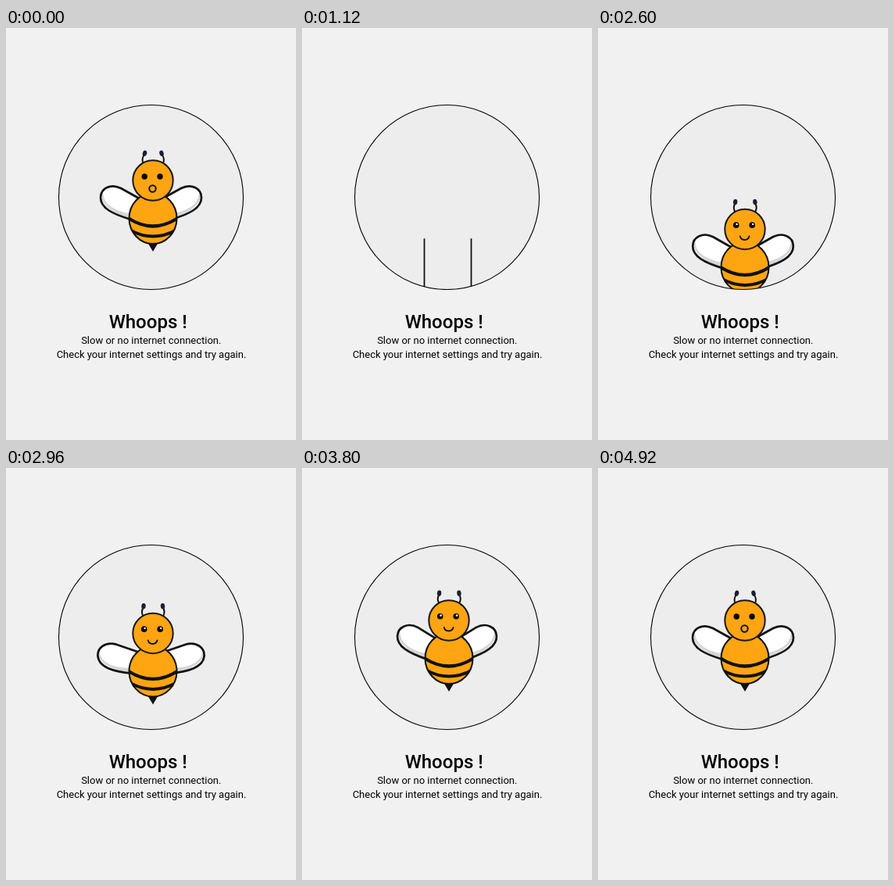
Animation of 371x527 px, one loop 4960 ms. Source, as an HTML page:

```html
<!DOCTYPE html>
<html lang="en">
<head>
<meta charset="utf-8">
<title>No connection</title>
<style>
  html, body { margin: 0; width: 100%; height: 100%; overflow: hidden; background: #f1f1f1; }
  svg { display: block; width: 100vw; height: 100vh; }
  text { font-family: Roboto, Arial, sans-serif; font-size: 13px; text-anchor: middle; fill: #000; }
  .title { font-size: 24px; font-weight: 500; }
  .line { fill: none; stroke: #111; stroke-linecap: round; stroke-linejoin: round; }
</style>
</head>
<body>
<svg viewBox="0 0 371 527">
  <defs>
    <clipPath id="porthole"><circle cx="185.5" cy="216.5" r="118"/></clipPath>
    <clipPath id="belly"><ellipse cx="188" cy="243.5" rx="30.5" ry="32.5"/></clipPath>
    <g id="wing">
      <path d="M174 220 L147 205 C134 198.500 121 205 121 217 C121 230 136 238 160 245 Z" fill="#fff"/>
      <path d="M124 209 C119 218 124 232 160 245 L160 238 C136 233 124 225 124 209 Z" fill="#d6d6d6"/>
      <path class="line" stroke-width="2.700" d="M174 220 L147 205 C134 198.500 121 205 121 217 C121 230 136 238 160 245"/>
    </g>
    <g id="feeler">
      <path class="line" stroke="#1a2030" stroke-width="2" d="M177 162 Q173 167 175.500 173"/>
      <ellipse cx="177.500" cy="160.300" rx="2.700" ry="3.700" transform="rotate(14 177.500 160.300)" fill="#1a2030"/>
    </g>
  </defs>

  <circle cx="185.500" cy="216.500" r="118" fill="#ededed"/>

  <g clip-path="url(#porthole)">
    <g id="bee">
      <use id="wingL" href="#wing"/>
      <g transform="translate(371 0) scale(-1 1)"><use id="wingR" href="#wing"/></g>
      <path d="M181.500 275 L194.500 275 L188 286 Z" fill="#111"/>
      <ellipse cx="188" cy="243.500" rx="30.500" ry="32.500" fill="#ffa512"/>
      <g clip-path="url(#belly)" class="line">
        <path stroke-width="4.200" d="M156 243 Q188 264 220 243"/>
        <path stroke-width="4" d="M156 257 Q188 276 220 257"/>
      </g>
      <ellipse class="line" cx="188" cy="243.500" rx="30.500" ry="32.500" stroke-width="2"/>
      <use id="feelL" href="#feeler"/>
      <g transform="translate(376.500 0) scale(-1 1)"><use id="feelR" href="#feeler"/></g>
      <circle cx="188" cy="195" r="25.700" fill="#ffa512" stroke="#17171c" stroke-width="2"/>

      <g id="surprised">
        <circle cx="177.200" cy="190" r="3.700"/>
        <circle cx="197" cy="190" r="3.700"/>
        <circle class="line" cx="187.500" cy="205.500" r="4.200" stroke-width="2"/>
      </g>
      <g id="happy">
        <circle cx="176.700" cy="189.700" r="3.800"/>
        <circle cx="197.200" cy="189.700" r="3.800"/>
        <circle cx="177.600" cy="188.600" r="1.300" fill="#fff"/>
        <circle cx="198.100" cy="188.600" r="1.300" fill="#fff"/>
        <path class="line" stroke-width="1.900" d="M181.700 204 C183.500 210 191.700 210 193.500 204"/>
      </g>
      <g id="sad">
        <path d="M172.500 190.500 Q176.500 183.500 180.300 190.500 Q176.500 188.300 172.500 190.500 Z"/>
        <path d="M193.500 190.500 Q197.300 183.500 201.300 190.500 Q197.300 188.300 193.500 190.500 Z"/>
        <path class="line" stroke-width="2.200" d="M181.200 206.800 Q187.500 202 194 206.800"/>
      </g>
    </g>
    <path id="streaks" fill="none" stroke="#111" stroke-width="1.800"/>
  </g>

  <circle cx="185.500" cy="216.500" r="118" fill="none" stroke="#000" stroke-width="1.100"/>

  <text class="title" x="181.700" y="384">Whoops !</text>
  <text x="185.800" y="404">Slow or no internet connection.</text>
  <text x="186" y="422">Check your internet settings and try again.</text>
</svg>

<script>
  const LOOP = 4960;
  const HOP = 500, GONE = 1160, BACK = 1940, SAD = 3900, RESET = 4900, LANDED = 3187;
  const HOP_Y = -22, DROP_Y = 328;
  const $ = id => document.getElementById(id);
  const mix = (a, b, k) => a + (b - a) * k;
  const show = (id, on) => $(id).setAttribute("visibility", on ? "inherit" : "hidden");

  // cubic-bezier(.42, 0, .58, 1), solved by bisection
  function easeInOut(x) {
    x = Math.min(1, Math.max(0, x));
    let lo = 0, hi = 1, u = x;
    for (let i = 0; i < 24; i++) {
      u = (lo + hi) / 2;
      const v = 1 - u;
      const at = 1.26 * u * v * v + 1.74 * u * u * v + u * u * u;
      if (at < x) lo = u; else hi = u;
    }
    return u * u * (3 - 2 * u);
  }

  function height(t) {
    if (t >= RESET) return 0;
    if (t < HOP) return mix(0, HOP_Y, easeInOut(t / HOP));
    if (t < GONE) return mix(HOP_Y, DROP_Y, easeInOut((t - HOP) / (GONE - HOP)));
    return Math.pow(Math.max(0, LANDED - t) * 0.0327, 1.4);
  }

  function turn(part, angle, x, y) {
    for (const side of ["L", "R"])
      $(part + side).setAttribute("transform", `rotate(${angle} ${x} ${y})`);
  }

  function draw(t) {
    const y = height(t);
    const flying = t >= BACK && t < RESET;
    const falling = t >= HOP + 10 && t < GONE;
    const beat = Math.cos(2 * Math.PI * (t - 4200) / 590);

    $("bee").setAttribute("transform", `translate(0 ${y})`);
    show("bee", t < GONE || t >= BACK);
    turn("wing", flying ? 2 + 10 * beat : 0, 168, 240);
    // wings turn in opposite senses because the right side is mirrored
    $("wingL").setAttribute("transform", `rotate(${flying ? -2 - 10 * beat : 0} 168 240)`);
    $("wingR").setAttribute("transform", `rotate(${flying ? -2 - 10 * beat : 0} 168 240)`);
    turn("feel", flying ? -8 + 1.5 * beat : 0, 175.5, 173);

    show("happy", flying && t < SAD);
    show("sad", flying && t >= SAD);
    show("surprised", !flying && (t < GONE || t >= RESET));

    show("streaks", falling);
    if (falling) {
      const top = mix(175.4, 270, easeInOut((t - HOP) / (GONE - HOP)));
      const end = Math.max(top, y + 200);
      $("streaks").setAttribute("d", `M156.500 ${top}V${end}M216.500 ${top}V${end}`);
    }
  }

  const start = performance.now();
  function tick() {
    draw((performance.now() - start) % LOOP);
    requestAnimationFrame(tick);
  }
  tick();
</script>
</body>
</html>
```
